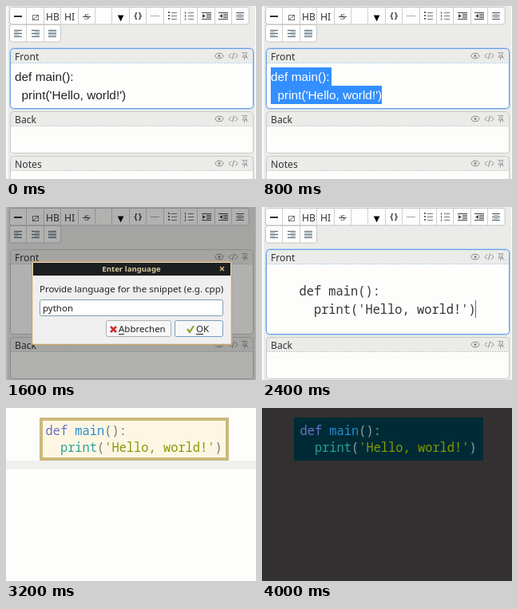
Recreate the animation shown at these times as an HTML page with a canvas. Size 313 by 217 pixels, loop 4.8 s.

```html
<!DOCTYPE html>
<html lang="en">
<head>
<meta charset="utf-8">
<title>Code snippet in a card editor</title>
<style>
html, body { margin: 0; width: 100%; height: 100%; overflow: hidden; background: #fdfefc; }
canvas { display: block; width: 313px; height: 217px; }
</style>
</head>
<body>
<canvas id="stage" width="313" height="217"></canvas>
<script>
const ctx = document.getElementById('stage').getContext('2d');
const W = 313, H = 217, STEP = 800;
const UI = '"Noto Sans", sans-serif';
const SANS = '15.4px "Liberation Sans", Arial, sans-serif';
const MONO = '15.36px "Noto Sans Mono", monospace';
const MONO_ADVANCE = 9.216;
const PAPER = '#fdfefc', PAGE = '#ebece9';

function rect(x, y, w, h, color) {
  ctx.fillStyle = color;
  ctx.fillRect(x, y, w, h);
}

function text(str, x, y, font, color, align = 'left') {
  ctx.font = font;
  ctx.fillStyle = color;
  ctx.textAlign = align;
  ctx.fillText(str, x, y);
}

function roundBox(x, y, w, h, r, fill, stroke, width = 1) {
  ctx.beginPath();
  ctx.roundRect(x, y, w, h, r);
  if (fill) { ctx.fillStyle = fill; ctx.fill(); }
  if (stroke) { ctx.strokeStyle = stroke; ctx.lineWidth = width; ctx.stroke(); }
}

function line(points, color, width = 1) {
  ctx.beginPath();
  for (let i = 0; i < points.length; i += 2) ctx.lineTo(points[i], points[i + 1]);
  ctx.strokeStyle = color;
  ctx.lineWidth = width;
  ctx.stroke();
}

// Five dense rows, every second one short; align is 0 left, .5 centre, 1 right
function paragraph(cx, cy, short, align) {
  for (let i = 0; i < 5; i++) {
    const w = i % 2 ? short : 10;
    rect(cx - 5, cy - 4 + i * 2, 10, 1, '#d3dde4');
    rect(Math.round(cx - 5 + (10 - w) * align), cy - 4 + i * 2, w, 1, i % 2 ? '#7593a8' : '#4a5a66');
  }
}

function list(cx, cy, numbered) {
  for (let i = -1; i <= 1; i++) {
    const y = cy + i * 4;
    rect(cx - 5, y - 1, numbered ? 1 : 2, numbered ? 3 : 2, '#666');
    rect(cx - 1, y, 7, 1, '#777');
  }
}

function indent(cx, cy, dir) {
  for (let i = 0; i < 5; i++) {
    const full = i === 0 || i === 4;
    rect(full ? cx - 6 : cx, cy - 4 + i * 2, full ? 12 : 6, 1, '#444');
  }
  const x = cx - 3;
  ctx.beginPath();
  ctx.moveTo(x + 2 * dir, cy + .5);
  ctx.lineTo(x - 2 * dir, cy - 2);
  ctx.lineTo(x - 2 * dir, cy + 3);
  ctx.fill();
}

function toolbar() {
  const pitch = 21.4, left = 4.5;
  const cx = i => Math.round(left + pitch * (i + .5));
  const row = (y, count) => {
    roundBox(left, y, pitch * count, 21.5, 3, PAPER, '#c4c4c4');
    for (let i = 1; i < count; i++) rect(Math.round(left + pitch * i - .5), y, 1, 21.5, '#cfcfcf');
  };
  row(1.5, 14);
  row(23.5, 3);

  rect(10, 12, 10, 2, '#333');
  ctx.strokeStyle = '#777';
  ctx.lineWidth = 1;
  ctx.strokeRect(33.5, 11.5, 7, 6);
  line([33, 18, 41, 11], '#555');
  text('HB', 58.5, 18, '12.2px ' + UI, '#333', 'center');
  text('HI', 79.5, 18, '12.2px ' + UI, '#333', 'center');
  text('S', 101, 17, 'bold 11px "Liberation Serif", serif', '#555', 'center');
  rect(96, 13, 10, 1, '#555');
  text('▼', 143.5, 18, '10px "DejaVu Sans", sans-serif', '#000', 'center');
  text('{', 162.5, 16, 'bold 11px ' + UI, '#444', 'center');
  text('}', 168, 16, 'bold 11px ' + UI, '#444', 'center');
  rect(181, 12, 11, 1, '#aaa');
  list(cx(9), 12, false);
  list(cx(10), 12, true);
  indent(cx(11), 12, 1);
  indent(cx(12), 12, -1);
  paragraph(cx(13), 12, 6, .5);
  paragraph(cx(0), 34, 6, 0);
  paragraph(cx(1), 34, 6, 1);
  paragraph(cx(2), 34, 10, 0);
}

function fieldIcons(y) {
  const color = '#888';
  ctx.beginPath();
  ctx.ellipse(267, y, 5, 3.3, 0, 0, 7);
  ctx.strokeStyle = color;
  ctx.lineWidth = 1;
  ctx.stroke();
  ctx.beginPath();
  ctx.arc(267, y, 1.6, 0, 7);
  ctx.fillStyle = color;
  ctx.fill();
  line([282, y - 3, 279, y, 282, y + 3], color);
  line([287, y - 3, 290, y, 287, y + 3], color);
  line([285.5, y - 4, 283.5, y + 4], color);
  line([297, y - 4, 301.5, y - 4, 300.5, y, 302, y + 1.5, 296, y + 1.5, 297.5, y - 1], color, .8);
  line([298.5, y + 1.5, 298.5, y + 5], color, .8);
  line([295, y - 5, 303, y + 4], color, .8);
}

function field(name, y, h, focused) {
  if (focused) roundBox(5.5, y + .5, 304, h - 1, 5, null, '#b7cff0', 3);
  roundBox(5.5, y + .5, 304, h - 1, 4, PAPER);
  ctx.save();
  ctx.clip();
  rect(5, y, 306, 18, PAGE);
  ctx.setLineDash([2, 1]);
  line([6, y + 18.5, 310, y + 18.5], focused ? '#b5cdea' : '#c6cac8');
  ctx.restore();
  roundBox(5.5, y + .5, 304, h - 1, 4, null, focused ? '#6a9fe6' : '#c6c8c5');
  text(name, 11, y + 15, '12.2px ' + UI, '#333');
  fieldIcons(y + 9.5);
}

function editor(frontHeight, focused) {
  rect(0, 0, W, H, PAPER);
  rect(2, 0, 310, H, PAGE);
  toolbar();
  const backTop = 53 + frontHeight + 3;
  field('Front', 53, frontHeight, focused);
  field('Back', backTop, 53, false);
  field('Notes', backTop + 56, 53, false);
}

function plainCode(selected) {
  editor(76, true);
  if (selected) {
    rect(11, 77, 76, 23, '#338fff');
    rect(11, 100, 139, 23, '#338fff');
  }
  const color = selected ? '#fff' : '#222';
  text('def main():', 11, 94, SANS, color);
  text("print('Hello, world!')", 19.5, 117, SANS, color);
}

function button(x, w, label, labelX, border) {
  roundBox(x + .5, 142.5, w - 1, 20, 2, '#f7f7f7', border);
  text(label, labelX, 157, '11.5px ' + UI, '#222');
  rect(labelX, 159, label === 'OK' ? 9 : 7, 1, '#222');
}

function dialog() {
  editor(107, false);
  rect(0, 0, W, H, 'rgba(0,0,0,.3)');
  roundBox(32.5, 68.5, 250, 104, 2, '#efefef', '#c8a565', 1.5);
  rect(34, 70, 247, 16, '#1c1f21');
  text('Enter language', 157, 81, 'bold 9.6px ' + UI, '#d8c9a0', 'center');
  line([268, 75, 273, 80], '#d9b878', 1.4);
  line([273, 75, 268, 80], '#d9b878', 1.4);
  text('Provide language for the snippet (e.g. cpp)', 42, 107, '11.55px ' + UI, '#222');
  roundBox(42.5, 116.5, 229, 20, 2, '#fff', '#7d9cb5');
  text('python', 46, 131, '11.5px ' + UI, '#222');
  button(125, 82, 'Abbrechen', 141, '#b0b0b0');
  button(211, 61, 'OK', 238, '#7d9cb5');
  line([131, 150, 138, 157], '#d03030', 2.6);
  line([138, 150, 131, 157], '#d03030', 2.6);
  line([227, 153, 230, 157, 235, 149], '#85a832', 2.2);
}

function monoCode() {
  editor(107, true);
  text('def main():', 46.5, 111, MONO, '#333');
  text("print('Hello, world!')", 46.5 + 2 * MONO_ADVANCE, 134, MONO, '#333');
  rect(267, 117, 1, 22, '#666');
}

function highlighted(x, punctuation) {
  const tokens = (col, y, parts) => {
    for (const [str, color] of parts) {
      text(str, x + col * MONO_ADVANCE, y, MONO, color);
      col += str.length;
    }
  };
  tokens(0, 34, [['def ', '#6c71c4'], ['main', '#268bd2'], ['():', punctuation]]);
  tokens(2, 55, [['print', '#2aa198'], ['(', punctuation], ["'Hello, world!'", '#859900'], [')', punctuation]]);
}

function lightCard() {
  rect(0, 0, W, H, PAPER);
  rect(0, 66, W, 11, '#f0f0ef');
  rect(42, 12, 237, 54, '#cbb97d');
  rect(46, 16, 229, 46, '#fdf6e3');
  highlighted(49.5, '#657b83');
}

function darkCard() {
  rect(0, 0, W, H, '#333031');
  rect(40, 12, 237, 54, '#002b36');
  highlighted(47.5, '#93a1a1');
}

const scenes = [() => plainCode(false), () => plainCode(true), dialog, monoCode, lightCard, darkCard];

function draw() {
  scenes[Math.floor(performance.now() / STEP) % scenes.length]();
  requestAnimationFrame(draw);
}
draw();
</script>
</body>
</html>
```
